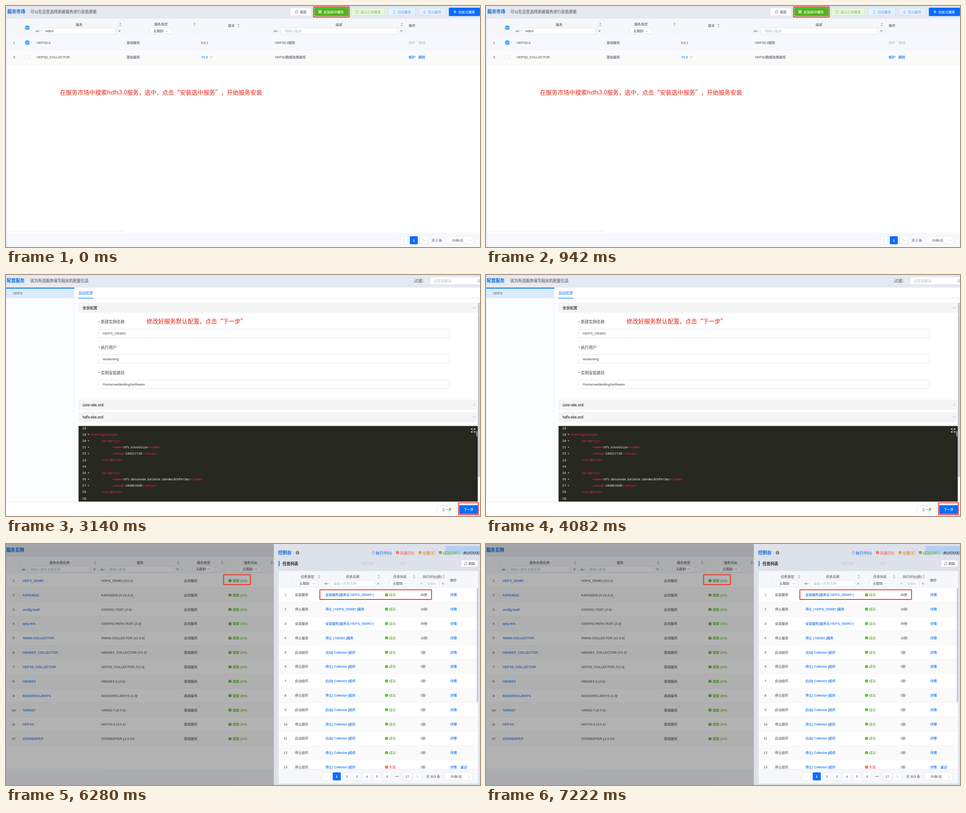
Write an HTML page that moves like this. It is 1049x534 px and loops after 7850 ms.

```html
<!DOCTYPE html>
<html>
<head>
<meta charset="utf-8">
<style>
html, body { margin: 0; width: 100%; height: 100%; overflow: hidden; background: #fff; }
svg { display: block; width: 1049px; height: 534px; font-family: "Liberation Sans", "Noto Sans CJK SC", "Noto Sans CJK", sans-serif; }
.cjk { font-family: "Noto Sans CJK SC", "Noto Sans CJK", sans-serif; }
.mono { font-family: "Liberation Mono", monospace; }
text { white-space: pre; text-spacing-trim: space-all; stroke-width: 0.14; }
</style>
</head>
<body>
<svg id="stage" viewBox="0 0 1049 534"></svg>
<script>
const STEP = 1570;
const INK = '#606266', DARK = '#303133', HINT = '#c0c4cc', LINE = '#e4e7ed', EDGE = '#dcdfe6';
const BLUE = '#0a6cff', LINK = '#1673ee', SKY = '#409eff', GREEN = '#5cb531', RED = '#f0655f', MARK = '#e8281f';
const HEAD = '#f5f7fa', STRIP = '#e6e9f1';

// Position mapping: x scale, x shift, y scale, y shift
let view = [1, 0, 1, 0];
const px = x => +(x * view[0] + view[1]).toFixed(2);
const py = y => +(y * view[2] + view[3]).toFixed(2);
const esc = s => s.replace(/&/g, '&amp;').replace(/</g, '&lt;');

function box(x1, y1, x2, y2, fill = 'none', stroke = 'none', r = 0, sw = 0.8) {
  const inset = stroke === 'none' ? 0 : sw / 2;
  const x = px(x1) + inset, y = py(y1) + inset;
  return `<rect x="${x}" y="${y}" width="${px(x2) - x - inset}" height="${py(y2) - y - inset}" rx="${r}" fill="${fill}" stroke="${stroke}" stroke-width="${sw}"/>`;
}
// y is the visual middle of the line
function text(x, y, s, fill = INK, size = 7.4, attrs = '') {
  return `<text x="${px(x)}" y="${(py(y) + size * 0.37).toFixed(2)}" font-size="${size}" fill="${fill}" stroke="${fill}" ${attrs}>${esc(String(s))}</text>`;
}
const mid = (x, y, s, fill, size, attrs = '') => text(x, y, s, fill, size, 'text-anchor="middle" ' + attrs);
const icon = (x, y, d, color, sw = 0.8, fill = 'none') =>
  `<path transform="translate(${px(x)} ${py(y)})" d="${d}" fill="${fill}" stroke="${color}" stroke-width="${sw}"/>`;
const dot = (x, y, r, fill) => `<circle cx="${px(x)}" cy="${py(y)}" r="${r}" fill="${fill}"/>`;
const note = (x, y, s, size = 13) => text(x, y, s, '#e03a2c', size, 'class="cjk"');
const mark = (x1, y1, x2, y2) => box(x1, y1, x2, y2, 'none', MARK, 1, 1.8);

const sorter = (x, y) => icon(x, y, 'M-3-1L0-4L3-1ZM-3 1L0 4L3 1Z', 'none', 0, '#b9bdc6');
const chevron = (x, y, color = '#909399') => icon(x, y, 'M-3-1.5L0 1.5L3-1.5', color);
const arrow = (x, y, dir, color = '#909399') => icon(x, y, `M${-dir * 1.5}-3L${dir * 1.5} 0L${-dir * 1.5} 3`, color);
const cross = (x, y) => icon(x, y, 'M-2-2L2 2M2-2L-2 2', INK, 0.9);
const refresh = (x, y) => icon(x, y, 'M-3-.6A3 3 0 0 1 2.5-1.6M2.6-3V-1.3H.9M3 .6A3 3 0 0 1-2.5 1.6M-2.6 3V1.3H-.9', INK, 0.8);
const spinner = (x, y) => icon(x, y, 'M3 0A3 3 0 1 1-3 0A3 3 0 1 1 3 0', SKY, '1.5" stroke-dasharray="1.2 1.15');
const okDot = (x, y) => dot(x, y, 3.4, GREEN) + icon(x, y, 'M-1.6 0L-.4 1.2L1.7-1.1', '#d3ecc6', 0.6);
const badDot = (x, y, color = RED) => dot(x, y, 3.4, color) + icon(x, y, 'M0-1.8V.5M0 1.1V1.9', '#fff', 0.8);

function check(x, y, state) {
  const on = state ? SKY : '#fff';
  const sign = { '-': 'M-2.3 0H2.3', v: 'M-2.3 0L-.6 1.8L2.4-1.7' }[state];
  return box(x - 4.5, y - 4.5, x + 4.5, y + 4.5, on, state ? SKY : EDGE, 1) + (sign ? icon(x, y, sign, '#fff', 1) : '');
}
const column = (s, x, sortX, y) => mid(x, y, s, INK) + sorter(sortX, y);
const filter = (opX, x1, x2, y, hint, hintX, crossX, color = HINT, op = 'm~') =>
  text(opX, y, op) + box(x1, y - 7.2, x2, y + 7.2, '#fff', EDGE, 1) + text(hintX, y, hint, color) + cross(crossX, y);
const select = (x1, x2, y, label, labelX, arrowX) =>
  box(x1, y - 7.2, x2, y + 7.2, '#fff', EDGE, 1) + text(labelX, y, label) + chevron(arrowX, y);
const button = (x1, y1, x2, y2, label, labelX, fill = '#fff', edge = EDGE, color = INK) =>
  box(x1, y1, x2, y2, fill, edge, 1) + text(labelX, (y1 + y2) / 2, label, color);
const title = (x, y, s) => text(x, y, s, '#1a73e0', 9.9, 'font-weight="bold"');
const topBar = (s, x, sub = '') => box(0, 0, 1049, 28, STRIP) + title(x, 12, s) + text(53.5, 12.5, sub, INK, 8.65);

function pager(x, y, pages, total, totalX, selX) {
  const cells = ['<', ...pages, '>'].map((p, i) => {
    const x1 = x + i * 22.15, c = x1 + 8.8, now = p === 1;
    if (p === '…') return [-2.6, 0, 2.6].map(d => dot(c + d, y, 0.9, INK)).join('');
    const cell = box(x1, y - 8.8, x1 + 17.6, y + 8.8, now ? BLUE : '#fff', now ? BLUE : LINE, 1);
    if (p === '<') return cell + arrow(c, y, -1, HINT);
    if (p === '>') return cell + arrow(c, y, 1);
    return cell + mid(c, y, p, now ? '#fff' : INK, 7.4, now ? 'font-weight="bold"' : '');
  });
  return cells.join('') + text(totalX, y, `共 ${total} 条`) +
    box(selX, y - 8.8, selX + 62, y + 8.8, '#fff', EDGE, 1) + text(selX + 13, y, '20条/页') + chevron(selX + 54, y, HINT);
}
const rules = (xs, y1, y2) => xs.map(x => box(x, y1, x + 0.8, y2, '#eaedf3')).join('');

function market() {
  const rows = [
    [81, 'v', 'HDFS3.0', 'HDFS3.0服务', HINT],
    [113.3, '', 'HDFS3_COLLECTOR', 'HDFS3数据收集服务', LINK]
  ].map(([y, state, name, about, color], i) =>
    mid(18, y, i + 1) + check(47, y, state) + text(68, y, name) + text(267, y, '基础服务') +
    text(595, y, about) + text(891, y, '维护', color) + text(913, y, '删除', color));
  return topBar('服务市场', 3) + text(54, 12.5, '可以在这里选择系统服务进行安装部署', INK, 8.65) +
    box(0, 28, 3, 534, '#eef1f7') +
    button(629, 4, 675, 22, '刷新', 650.5) + refresh(643, 13) +
    button(682.5, 3.5, 758, 22.5, '安装选中服务', 703, '#4fb51a', '#4fb51a', '#fff') +
    icon(695, 13, 'M-3.5 3.5L2-2M3.5 3.5L-2-2M-4-2L-2-4M1.5-3.5L3.5-1.5', '#fff', 1.6) + mark(679.7, 1.2, 760.5, 25.5) +
    button(764, 4, 839, 22, '接入已有服务', 785, '#eaf5e3', '#c3e4b2', '#84c464') +
    icon(777, 13, 'M-3.5-3H3.5M-3.5 0H1M-3.5 3H3.5M1-1.5L3 0L1 1.5', '#84c464') +
    button(846, 4, 906, 22, '导出服务', 867, '#e7f1fc', '#b9d9fb', '#66acf6') +
    icon(859, 13, 'M-3.3 3.3H3.3M0 1.5V-3.5M-2.2-1.3L0-3.5L2.2-1.3', '#66acf6') +
    button(913, 4, 973, 22, '导入服务', 934, '#e7f1fc', '#b9d9fb', '#66acf6') +
    icon(926, 13, 'M-3.3 3.3H3.3M0-3.5V1.5M-2.2-.7L0 1.5L2.2-.7', '#66acf6') +
    button(980, 3.7, 1049, 22.3, '自定义服务', 1001, BLUE, BLUE, '#fff') + icon(993.5, 13, 'M-3.7 0H3.7M0-3.7V3.7', '#fff', 1) +
    box(3, 28, 1049, 65, HEAD) + rules([33, 62, 260, 425, 589, 885], 28, 65) +
    box(3, 65, 1049, 98, '#f5f9ff') + box(3, 98, 1049, 130, '#fafafa') +
    box(3, 97.3, 1049, 98, '#ebeef5') + box(3, 130, 1049, 130.8, '#ebeef5') +
    check(47, 48, '-') + column('服务', 162, 253, 41) + filter(66, 80, 243, 55.3, 'hdfs3', 87, 251, INK) +
    column('服务类型', 343, 417, 40.5) + select(318, 367, 55, '无限制', 326, 355) +
    column('版本', 499, 514.5, 43) + column('描述', 737, 876, 41) +
    filter(593, 607, 867, 55.3, '请输入描述', 617, 875) + text(891, 43, '操作') +
    rows.join('') + text(431, 81, '3.0.1') + text(432, 113.5, 'V1.0', SKY, 7.2, 'font-weight="bold"') + chevron(454.5, 113.3) +
    note(119.5, 191.5, '在服务市场中搜索hdfs3.0服务，选中，点击“安装选中服务”，开始服务安装') +
    box(3, 498.8, 261, 499.6, LINE) + box(3, 502, 1049, 534, '#f7f8fb') +
    pager(871.5, 519, [1], 2, 942, 974);
}

function nodes() {
  const small = '8Cores|1.12TB|15.51GB|centos7...';
  const rows = [
    ['temp01.rack.demo.test', '10.208.50.235', '24Cores|4.00TB|62.77GB|CentO...', '#fdfdfe'],
    ['test01v.sys.rack.demo.test', '10.173.220.228', small, '#f0f4fd'],
    ['test02v.sys.rack.demo.test', '10.173.220.229', small.replace('1.12', '3.28'), '#f7f9fe'],
    ['test03v.sys.rack.demo.test', '10.173.220.222', small, '#f0f4fd']
  ].map(([name, ip, spec, fill], i) => {
    const top = 97.3 + i * 32.7, y = top + 16;
    return box(159, top, 1039, top + 32.7, fill) + box(159, top + 32, 1039, top + 32.7, '#ebeef5') +
      mid(174.5, y, i + 1) + check(204, y, i ? 'v' : '') + text(224.5, y, name) + text(398, y, ip) +
      (i ? text(519, y, 'JournalNode') : '') + text(671, y, spec) + text(802, y, '默认资源池');
  });
  const side = ['JournalNode', 'NameNode', 'DataNode'].map((s, i) =>
    text(27, 61.3 + i * 21.4, s) + (i ? text(98.5, 61.3 + i * 21.4, '(至少1个节点)', RED) : ''));
  return topBar('分配节点', 1.5, '请为服务选择已有的服务实例，或者为每个新建服务的组件分配安装节点，新建服务时所选的节点必须在同一个资源池下') +
    box(0, 28, 150, 500, '#fcfdff') + box(0, 28, 1, 534, LINE) + box(149.3, 28, 150, 500, LINE) + box(0, 27, 150, 29, BLUE) +
    box(1, 51, 149, 72, '#d9ebfd') + icon(9, 40, 'M-2.5-1.2H2.5L0 1.6Z', 'none', 0, HINT) + text(16, 40, 'HDFS') +
    side.join('') + okDot(133, 61) + text(140.5, 61.3, '3') +
    box(159, 51, 1040, 52, LINE) + box(159, 50, 191, 52, '#4c9af5') + text(159, 39.5, '新建实例', '#4c9af5', 8) +
    text(211, 40, '实例名称：HDFS_DEMO', INK, 8.65) + dot(330, 39.5, 7, BLUE) +
    icon(330, 39.5, 'M-3 2L1.5-3L3-1.5L-1.5 3L-3 3ZM0 3.3H3.5', '#fff') +
    box(159, 60, 1039, 97.3, HEAD) + rules([190, 217, 391, 512, 664, 795, 897], 60, 97) + check(204, 81, '-') +
    column('节点名称', 306, 384, 73) + filter(222.5, 236, 375, 88, '请输入节点名称', 242, 382.5) +
    column('IP', 453, 505, 73) + filter(395.5, 409, 496, 88, '请输入IP', 415, 504) +
    column('已选服务', 581.5, 604, 75.5) +
    column('节点配置', 731, 788, 73) + filter(668.5, 682.5, 779, 88, '请输入节点配置', 688, 787) +
    column('资源池', 847.5, 890, 73) + select(822, 871, 87.5, '无限制', 830, 859) +
    column('标签', 969, 1031, 73) + filter(901.5, 915, 1022, 88, '请输入标签', 920, 1030) +
    rows.join('') + box(904, 139.5, 945.5, 152, '#e3ebe7', 'none', 6) + mid(924.7, 146, 'sample_tag', '#84968c') +
    box(158.5, 60, 159.2, 491, '#ebeef5') + box(1039, 60, 1039.7, 491, '#ebeef5') +
    note(176.5, 257.5, '为服务的每一个组件选择好安装节点，点击“下一步”', 12.95) +
    box(159, 459, 1039, 491, HEAD) + box(159, 459, 1039, 459.8, LINE) +
    check(172, 475, '') + text(182, 475, '选择所有分页数据', INK, 8.7) + dot(263, 474.5, 4.3, INK) +
    mid(263, 474.5, '?', '#fff', 6.5, 'font-weight="bold"') + pager(862.5, 475, [1], 4, 933, 965) +
    box(0, 500, 1049, 501, LINE) + text(781, 518, '选择提示：NameNode 选择的节点不符合规则', '#909399') +
    button(946, 508, 988, 527.5, '上一步', 956) + button(993, 508, 1036, 527.5, '下一步', 1004, '#a0cfff', '#a0cfff', '#fff') +
    mark(989.7, 501.5, 1038.5, 529.7);
}

function codeLine(no, i) {
  const y = 339 + i * 14.18;
  const tag = s => `<tspan fill="#f92672">${esc(s)}</tspan>`;
  const pair = (k, v) => [12, tag(`<${k}>`) + v + tag(`</${k}>`)];
  const [indent, body] = {
    19: [0, tag('<configuration>')], 20: [6, tag('<property>')],
    21: pair('name', 'dfs.blocksize'), 22: pair('value', '134217728'), 23: [6, tag('</property>')],
    25: [6, tag('<property>')], 26: pair('name', 'dfs.datanode.balance.bandwidthPerSec'),
    27: pair('value', '104857600'), 28: [6, tag('</property>')]
  }[no] || [0, ''];
  const folds = body && no !== 23 && no !== 28;
  return text(177.5, y, no, '#d2d2cc', 7.2, 'class="mono" text-anchor="end"') +
    (folds ? icon(182.5, y, 'M-1.8-.9H1.8L0 1.3Z', 'none', 0, '#d2d2cc') : '') +
    `<text class="mono" x="${187 + indent * 4.07}" y="${y + 2.4}" font-size="6.8" fill="#f8f8f2">${body}</text>`;
}

function config() {
  const fields = [['新建实例名称', 'HDFS_DEMO'], ['执行用户', 'weilanting'], ['实例安装路径', '/home/weilanting/software']]
    .map(([label, value], i) => {
      const y = 104 + i * 56.3;
      return text(204.5, y + 0.5, '*', RED, 8.6) + text(210, y, label, INK, 8.75) +
        box(204, y + 15.7, 982, y + 35.5, '#fff', EDGE, 1) + text(214, y + 25.4, value, INK, 8.1);
    });
  const panels = [[61, '安装配置'], [276, 'core-site.xml'], [303.3, 'hdfs-site.xml']]
    .map(([y, s], i) => box(160, y, 1044, y + 23, '#f5f5f6') + text(169.5, y + 11.5, s, DARK, 8.2) +
      (i === 1 ? arrow(1036, y + 11.5, 1) : chevron(1036.5, y + 11.5)));
  const lines = Array.from({ length: 12 }, (_, i) => codeLine(18 + i, i));
  return topBar('配置服务', 1.5, '请为所选服务填写相关的配置信息') +
    text(903.5, 12.8, '过滤：', INK, 8.7) + box(938, 4, 1056, 21.5, '#fff', EDGE, 1) + text(947, 13, '过滤关键词', HINT, 7.7) +
    icon(1046, 13, 'M2.6 0A2.6 2.6 0 1 1-2.6 0A2.6 2.6 0 1 1 2.6 0M2 2L4 4', '#909399') +
    box(0, 28, 150, 502, '#fcfdff') + box(0, 28, 1, 534, LINE) + box(150, 28, 150.8, 502, LINE) +
    box(0, 28, 151, 30, BLUE) + box(1, 30, 150.5, 51, '#d9ebfd') + text(16, 40, 'HDFS') +
    box(160, 51, 1049, 52, LINE) + box(160, 50.5, 193, 52.3, '#4c9af5') + text(160, 39.8, '基础配置', '#4c9af5', 8.2) +
    panels.join('') + fields.join('') + note(311, 102, '修改好服务默认配置，点击“下一步”') +
    box(160.5, 334.5, 1044, 502, '#272822') + lines.join('') +
    icon(1034, 344.5, 'M-1-1L-4-4M-4-1.5V-4H-1.5M1-1L4-4M1.5-4H4V-1.5M-1 1L-4 4M-4 1.5V4H-1.5M1 1L4 4M1.5 4H4V1.5', '#fff', 1) +
    box(1040, 346, 1044, 357.5, '#6c6c6a') + box(1044.5, 61, 1048.5, 448, '#c3c4c7', 'none', 2) +
    box(0, 502, 1049, 534, '#fff') + box(0, 502, 1049, 502.8, LINE) +
    button(954, 510, 997, 529.5, '上一步', 964.5) + button(1003, 510, 1044.5, 529.5, '下一步', 1013, BLUE, BLUE, '#fff') +
    mark(1000.5, 503.7, 1046.3, 532);
}

const SERVICES = [
  ['HDFS_DEMO', 'HDFS_DEMO', '3.0.1', '3/3'], ['KAFKA010', 'KAFKA010', '0.10.2.2', '1/1'],
  ['config-test2', 'CONFIG-TEST', '1.0', '2/2'], ['qwy-test', 'CONFIG-PATH-TEST', '3.0', '1/1'],
  ['XMAN-COLLECTOR', 'XMAN-COLLECTOR', 'v1.5.4', '1/1'], ['HBASE2_COLLECTOR', 'HBASE2_COLLECTOR', 'V1.0', '2/2'],
  ['HDFS3_COLLECTOR', 'HDFS3_COLLECTOR', 'V1.0', '2/2'], ['HBASE2', 'HBASE2.0', '2.0', '2/2'],
  ['BIGDATACLIENTS', 'BIGDATACLIENTS', '1.0', '6/6'], ['YARN27', 'YARN2.7', '2.7.2', '4/4'],
  ['HDFS3', 'HDFS3.0', '3.0.1', '4/4'], ['ZOOKEEPER', 'ZOOKEEPER', '3.4.10', '1/1']
];

function instances(busy) {
  const rows = SERVICES.map(([name, kind, version, health], i) => {
    const top = 65 + i * 31.77, y = top + 15.6;
    const label = text(212, y, kind + ' ').replace('</text>', `<tspan font-style="italic">(${version})</tspan></text>`);
    const state = busy && !i ? spinner(495, y) + text(501, y, '安装中', LINK)
      : okDot(495, y) + text(501, y, `健康 (${health})`, GREEN);
    return box(0, top, 592, top + 31.8, i % 2 ? '#fafafa' : '#fff') + box(0, top + 31, 592, top + 31.8, '#ebeef5') +
      mid(19, y, i + 1) + text(39, y, name, LINK) + label + text(394, y, i < 5 ? '应用服务' : '基础服务') + state;
  });
  return box(-4, 0, 592, 28, STRIP) + title(3, 12.5, '服务实例') + box(-4, 28, 592, 65, HEAD) +
    rules([32, 205, 386, 484], 28, 65) +
    column('服务实例名称', 120, 198, 41) + filter(37, 50, 189, 55.3, '请输入服务实例名称', 56, 197) +
    column('服务', 297.5, 381, 41) + filter(210, 223, 372, 55.3, '请输入服务', 229, 379.5) +
    column('服务类型', 437, 478, 40.5) + select(413, 461, 55, '无限制', 420, 449.5) +
    column('服务状态', 540.5, 587, 40.5) + select(516, 563.5, 55, '无限制', 523, 553) +
    rows.join('') + box(0, 494.5, 207, 495.3, LINE) + box(-4, 498, 592, 540, HEAD) +
    box(-4, -4, 592, 540, 'rgba(0,0,0,.3)');
}

function drawer(busy, tasks, pages) {
  const rows = tasks.map(([type, name, time, failed], i) => {
    const top = 96.3 + i * 31.72, y = top + 15.7;
    const state = busy && !i
      ? box(836, y - 2.8, 878, y + 0.8, '#e6e9f0', 'none', 1.8) + box(836, y - 2.8, 849.5, y + 0.8, '#2f86f0', 'none', 1.8) + text(881, y - 0.5, '33%')
      : (failed ? badDot : okDot)(839.5, y) + text(845, y, failed ? '失败' : '成功', failed ? RED : GREEN);
    return box(602, top, 1041, top + 31.8, i % 2 ? '#fafafa' : '#fff') + box(602, top + 31, 1041, top + 31.8, '#ebeef5') +
      mid(617, y, i + 1) + text(638, y, type) + text(705, y, name, LINK) + state +
      text(914, y, time) + text(979.5, y, '详情', LINK) + (failed ? text(1002, y, '重试', LINK) : '');
  });
  const count = (x, s, color) => text(x, 19, s, color, 8.3);
  const warn = busy ? '#ee6a4d' : '#f08a33';
  return box(591.5, -4, 1055, 540, '#dde1e9') +
    box(969, 4, 1045, 22, '#b4cff2') + text(940, 13, '刷新', '#cdd2da') + text(784, 43, '服务类型', '#cbd0d8') + text(869, 43, '操作', '#cbd0d8') +
    title(601, 19, '控制台') + dot(643.5, 19, 4, '#7c8087') + mid(643.5, 19, 'i', '#fff', 6, 'font-weight="bold"') +
    spinner(811, 19) + count(816, `执行中(${busy ? 1 : 0})`, LINK) +
    badDot(863.5, 18.5) + count(869, '失败(33)', RED) + badDot(913, 18.5, warn) + count(919, '告警(3)', warn) +
    okDot(958, 18.5) + count(964, `成功(${busy ? 286 : 287})`, GREEN) + count(1008, '共计(323)', DARK) +
    box(602, 37, 604, 48.5, BLUE) + text(611, 43, '任务列表', DARK, 8.6, 'font-weight="bold"') +
    button(1003, 35, 1041, 50.5, '刷新', 1020) + refresh(1013, 42.8) +
    box(602, 59, 1041, 96.3, HEAD) + rules([632, 698, 830, 908, 973], 59, 96) +
    column('任务类型', 665.5, 691, 72) + select(641, 690, 87, busy ? '已选 (1)' : '无限制', 647.5, 680) +
    column('任务名称', 765, 822, 72) + filter(703, 716, 813, 87, '请输入任务名称', 722, 821) +
    column('任务状态', 869, 900, 72) + select(845.5, 891, 87, '无限制', 853, 881.5) +
    column('执行时长(秒)', 940, 965, 72) + filter(914.5, 925, 955.5, 87, '请输入', 927.5, 963.5, HINT, '=') +
    text(979, 79.5, '操作') + rows.join('') + box(1038, 96.5, 1041, 349, '#c4c6ca', 'none', 1.5) +
    box(602, 497, 1041, 529, HEAD) + box(602, 497, 1041, 497.8, LINE) + pages;
}

function installing() {
  const install = (s, time) => ['安装服务', `安装服务[服务名:${s} ]`, time];
  const grow = (s, time, failed) => ['安装服务', `服务扩容[服务名:${s}`, time, failed];
  const big = 'BIGDATACLIEN...', test = 'config-test2]';
  const tasks = [
    install('HDFS_DEMO', '6秒'), install('HDFS_DEMO', '39秒'), grow('XMAN-COLLEC...', '16秒'),
    install('KAFKA010', '11秒'), install('DEMO', '1分4秒'),
    ...[11, 15, 15, 11].map(s => grow(test, s + '秒')), grow(big, '14秒', true),
    install('config-test2', '38秒'), grow(big, '22秒', true), grow(big, '14秒', true)
  ];
  return instances(true) + drawer(true, tasks, pager(817, 513.5, [1, 2, 3], 53, 931.5, 968)) +
    mark(29, 67, 543.7, 91.5) + mark(699.7, 100.5, 1007.7, 125);
}

function finished() {
  view = [1.006, -2.3, 1.0025, 0.4];
  const install = ['安装服务', '安装服务[服务名:HDFS_DEMO ]', '39秒'];
  const stop = (s, time) => ['停止服务', `停止 [ ${s} ]服务`, time];
  const parts = Array.from({ length: 9 }, (_, i) => {
    const verb = i % 2 || i === 8 ? '停止' : '启动';
    return [verb + '组件', `${verb}[ Collector ]组件`, '1秒', i === 8];
  });
  const tasks = [install, stop('HDFS_DEMO', '16秒'), install, stop('DEMO', '10秒'), ...parts];
  const pages = pager(699, 513.2, [1, 2, 3, 4, 5, 6, '…', 17], 323, 926.5, 967.5);
  const body = instances(false) + drawer(false, tasks, pages);
  view = [1, 0, 1, 0];
  return body + mark(480.7, 67.3, 542, 90.7) + mark(693.7, 100.5, 942.7, 123.7);
}

const stage = document.getElementById('stage');
stage.innerHTML = [market, nodes, config, installing, finished].map(draw => `<g>${draw()}</g>`).join('');
const scenes = [...stage.children];
const start = performance.now();

function tick() {
  const now = Math.floor((performance.now() - start) / STEP) % scenes.length;
  scenes.forEach((g, i) => { g.style.display = i === now ? '' : 'none'; });
  requestAnimationFrame(tick);
}
tick();
</script>
</body>
</html>
```
